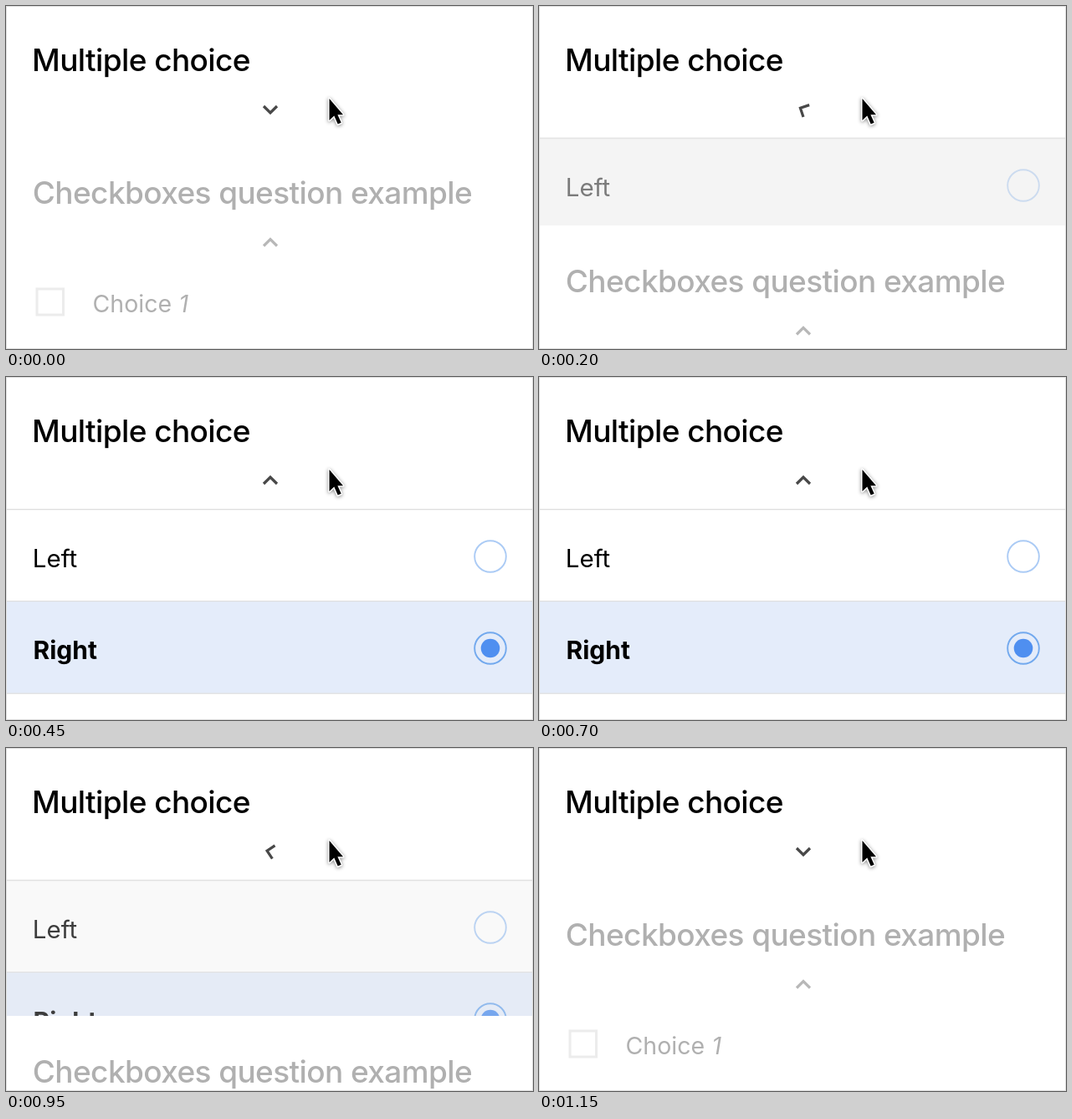
An HTML page for the animation above (1580 ms loop, 630x411 px).

```html
<!DOCTYPE html>
<html lang="en">
<head>
<meta charset="utf-8">
<title>Expanding question</title>
<style>
  html, body { margin: 0; width: 100%; height: 100%; overflow: hidden; background: #fff; }
  svg { display: block; width: 630px; height: 411px; }
  text { font-family: Inter, "Open Sans", sans-serif; font-size: 29.5px; }
  .title { font-size: 37px; font-weight: 550; letter-spacing: -.6px; }
  .chosen { font-size: 30px; font-weight: 700; }
  .choice { font-size: 28.5px; }
  .muted { fill: #b0b0b0; }
  .chevron { fill: none; stroke: #484848; stroke-width: 3.2; }
  .muted .chevron { stroke: #b8b8b8; }
  .line { fill: #dedede; }
  .radio { fill: none; stroke-width: 1.9; }
  .cursor { stroke: #fff; stroke-width: 3; paint-order: stroke; stroke-linejoin: round;
    filter: drop-shadow(0 1.5px 2px rgba(0, 0, 0, .45)); }
</style>
</head>
<body>
<svg viewBox="0 0 630 411">
  <rect y="157" width="630" height="254" fill="#ebebeb"/>
  <g id="list">
    <rect y="157" width="630" height="223" fill="#fff"/>
    <rect y="269" width="630" height="110" fill="#e4ecfa"/>
    <rect class="line" y="158" width="630" height="1.3"/>
    <rect class="line" y="268" width="630" height="1.2"/>
    <rect class="line" y="378.6" width="630" height="1.2"/>
    <text x="31.8" y="228">Left</text>
    <text class="chosen" x="32.5" y="338">Right</text>
    <circle class="radio" cx="579" cy="215" r="18.8" stroke="#abcbf5"/>
    <circle class="radio" cx="579" cy="325" r="18.8" stroke="#72a9ee"/>
    <circle cx="579" cy="325" r="11.3" fill="#4f8ff0"/>
  </g>

  <g id="below" class="muted">
    <rect y="157" width="630" height="254" fill="#fff"/>
    <text class="title" x="31.8" y="236.5">Checkboxes question example</text>
    <path class="chevron" d="M308 287.5l8-8 8 8"/>
    <rect x="37" y="339" width="31.5" height="31" fill="none" stroke="#ececec" stroke-width="3"/>
    <text class="choice" x="103.5" y="367">Choice <tspan x="206.5" font-style="italic">1</tspan></text>
  </g>

  <text class="title" x="31" y="77.5">Multiple choice</text>
  <path id="arrow" class="chevron" d="M308 120l8 8 8-8"/>
  <path class="cursor" d="M386.5 111v26l5.8-5.4 4.4 10 4-1.8-4.3-9.6h6.6z"/>
  <rect x=".5" y=".5" width="629" height="410" fill="none" stroke="#e0e0e0"/>
</svg>
<script>
  const LOOP = 1580, STEP = 50, HEIGHT = 223;
  const [list, below, arrow] = ["list", "below", "arrow"].map(id => document.getElementById(id));

  const ease = (t, start, length) => {
    const x = Math.min(1, Math.max(0, (t - start) / length));
    return x * x * (3 - 2 * x);
  };

  // Rises on opening, falls on closing; closed until the first change.
  const openness = (t, open, close, length) =>
    t < 100 ? 0 : ease(t, open, length) - ease(t, close, length);

  function draw(now) {
    const t = Math.floor(now % LOOP / STEP) * STEP;
    const panel = openness(t, 78, 865, 252);
    const turn = openness(t, 56, 840, 240);
    list.setAttribute("opacity", panel);
    below.setAttribute("transform", `translate(0 ${Math.round(HEIGHT * panel)})`);
    arrow.setAttribute("transform", `rotate(${180 * turn} 316 124)`);
  }

  const start = performance.now();
  function frame() {
    draw(performance.now() - start);
    requestAnimationFrame(frame);
  }
  frame();
</script>
</body>
</html>
```
